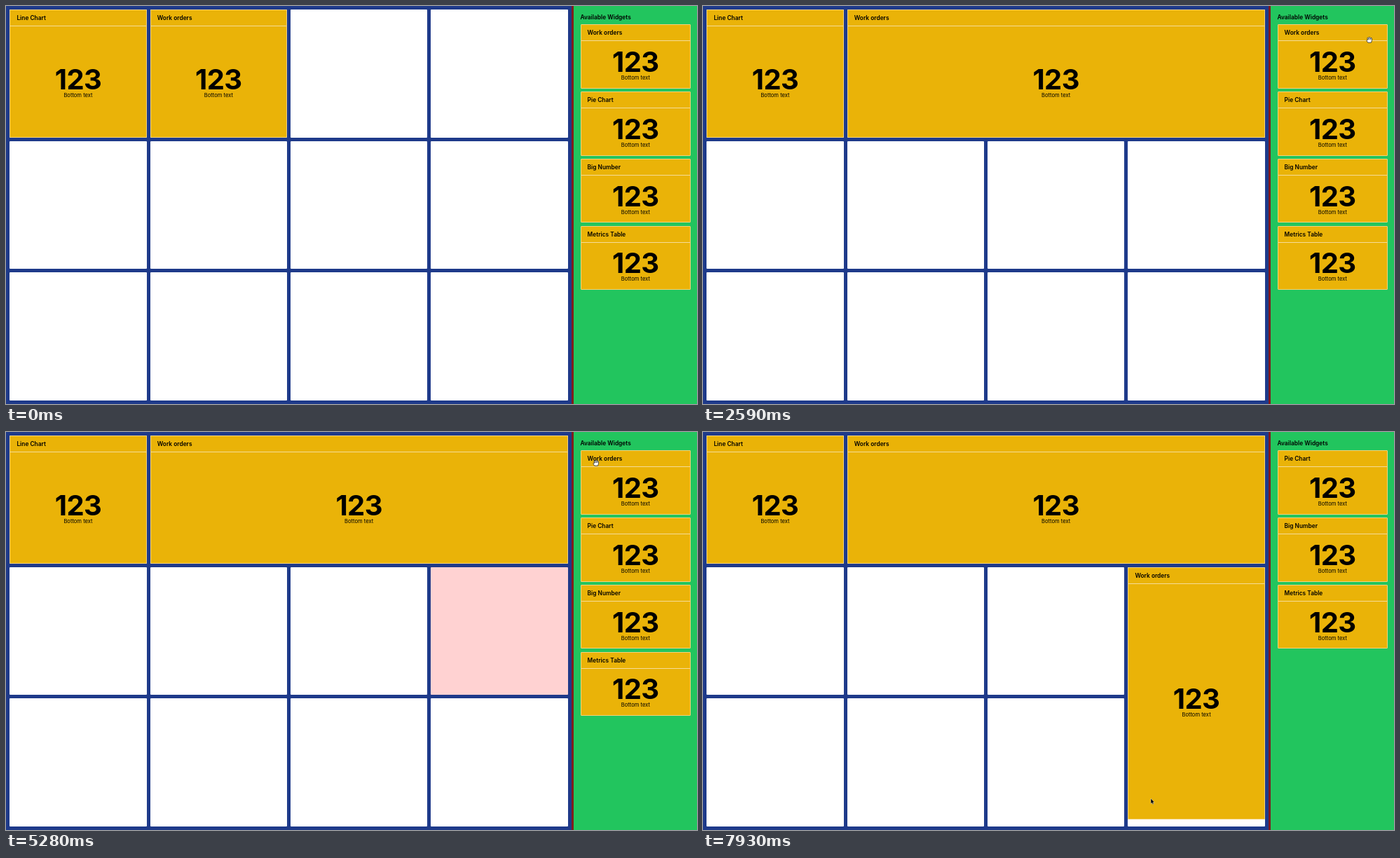
An HTML page that plays this animation: 986x568 px, repeating every 8 s.

```html
<!DOCTYPE html>
<html lang="en">
<head>
<meta charset="utf-8">
<title>Widget dashboard</title>
<style>
html, body { margin: 0; width: 100%; height: 100%; overflow: hidden; }
body { position: relative; background: #1e3a8a; color: #000; font-family: Inter, "Open Sans", sans-serif; }
.cell, .card, #side, #cursor { position: absolute; }
.cell { background: #fff; border-radius: 1px; }
#side { left: 806.5px; top: 0; width: 180px; height: 568px; box-sizing: border-box; background: #22c55e; border-left: 3.6px solid #7f1d1d; }
h2, h3 { margin: 0; font-size: 8.35px; font-weight: 600; line-height: 22px; white-space: nowrap; }
h2 { position: absolute; left: 819.5px; top: 4.5px; }
h3 { height: 22px; padding-left: 9px; border-bottom: 1px solid #f5dc98; }
.card { display: flex; flex-direction: column; box-sizing: border-box; background: #eab308; border: 1px solid #f3d27c; border-radius: 1px; }
.body { flex: 1; display: flex; flex-direction: column; justify-content: center; align-items: center; padding-bottom: 1px; }
.body span { display: inline-block; }
.num { margin: -2px 0 -3px; font-size: 40px; font-weight: 700; line-height: 45px; letter-spacing: -.6px; }
.note { position: relative; font-size: 7.6px; line-height: 8px; }
.sel span { background: #b1b8a4; }
.sel h3 span { padding: 1px 0; }
.sel .num span { padding-right: 8px; margin-right: -8px; }
.hot::after { content: ""; position: absolute; inset: 0; background: rgba(255, 0, 0, .175); }
.card.hot::after { inset: -1px; }
#cursor { left: 0; top: 0; width: 12px; height: 12px; overflow: visible; }
</style>
</head>
<body>
<div id="side"></div>
<h2>Available Widgets</h2>
<script>
const LOOP = 8000, LAST = 7930;

function add(cls, html = "") {
  const el = document.createElement("div");
  el.className = cls;
  el.innerHTML = html;
  return document.body.appendChild(el);
}

function place(el, x, y, w, h) {
  Object.assign(el.style, { left: x + "px", top: y + "px", width: w + "px", height: h + "px" });
}

// Places an element on the grid, measured in columns and rows.
function onGrid(el, col, row, cols = 1, rows = 1) {
  place(el, 5.4 + 200.35 * col, 5.4 + 187.4 * row, 200.35 * cols - 5.15, 187.4 * rows - 4.8);
}

const card = title => add("card",
  `<h3><span>${title}</span></h3><div class="body"><div class="num"><span>123</span></div>` +
  `<div class="note"><span>Bottom text</span></div></div>`);

const cells = Array.from({ length: 12 }, (_, i) => {
  const el = add("cell");
  onGrid(el, i % 4, i >> 2);
  return el;
});
const line = card("Line Chart"), orders = card("Work orders"), dropped = card("Work orders");
const list = ["Work orders", "Pie Chart", "Big Number", "Metrics Table"].map(card);
onGrid(line, 0, 0);

document.body.insertAdjacentHTML("beforeend", `<svg id="cursor">
  <path id="arrow" d="M0 0V7.6L1.7 6.1 2.8 8.5 4 8 3 5.6H5.2Z" fill="#000" stroke="#fff" stroke-width=".4"/>
  <path id="hand" d="M-2.2 4.2L-4 1.6Q-4-.1-2.6.6L-3-2.2Q-2.4-3.6-1.6-2.4Q-1-4.6.2-2.8Q1.2-4.2 1.9-2.4Q3.4-3 3.5-1.2Q3.8 2 2.4 4.2Z
    M-1.4-2V0M.2-2.4V0M1.8-2V0" fill="#fff" stroke="#222" stroke-width=".8"/></svg>`);
const [cursor, arrow, hand] = ["cursor", "arrow", "hand"].map(id => document.getElementById(id));

// The pointer rests between these moves.
const moves = [
  { from: 340, to: 1060, x: 605, y: 117 },  // widen to two columns
  { from: 1630, to: 1720, x: 700, y: 112 }, // pull towards three
  { from: 1930, to: 2310, x: 951, y: 48 },  // over to the list
  { from: 2590, to: 3010, x: 936, y: 45 },
  { from: 4610, to: 5280, x: 842, y: 44 },  // drag a card out
  { from: 5940, to: 6470, x: 624, y: 299 },
  { from: 6490, to: 7040, x: 640, y: 370 }, // to its lower edge
  { from: 7450, to: 7700, x: 639, y: 523 }  // pull it down
];

const within = (t, a, b) => t >= a && t < b;
const progress = (t, a, b) => Math.min(1, Math.max(0, (t - a) / (b - a)));
const easeOut = (t, a, b) => 1 - (1 - progress(t, a, b)) ** 3;
const show = (el, on) => { el.style.display = on ? "" : "none"; };

function cursorAt(t) {
  let x = 390, y = 200;
  for (const m of moves) {
    const p = progress(t, m.from, m.to);
    x += (m.x - x) * p;
    y += (m.y - y) * p;
  }
  return [x, y];
}

function draw(t) {
  t = Math.min(t, LAST);
  onGrid(orders, 1, 0, 1 + easeOut(t, 780, 1060) + easeOut(t, 1930, 2310));
  onGrid(dropped, 3, 1, 1, 1 + easeOut(t, 7680, 8080));

  const isDropped = t >= 5740;
  show(dropped, isDropped);
  show(list[0], !isDropped);
  list.forEach((el, i) => place(el, 819.6, 26.3 + 95.8 * (i - isDropped), 157.5, 91.5));

  const dragging = within(t, 1270, 1930);
  line.classList.toggle("sel", dragging);
  orders.classList.toggle("sel", dragging);
  orders.classList.toggle("hot", dragging);
  cells[7].classList.toggle("hot", within(t, 5180, 5740));

  const isHand = within(t, 2250, 5940);
  const [x, y] = cursorAt(t);
  show(cursor, t >= 340);
  show(arrow, !isHand);
  show(hand, isHand);
  cursor.style.transform = `translate(${x}px, ${y}px)`;
}

const start = performance.now();
function tick() {
  draw((performance.now() - start) % LOOP);
  requestAnimationFrame(tick);
}
tick();
</script>
</body>
</html>
```
